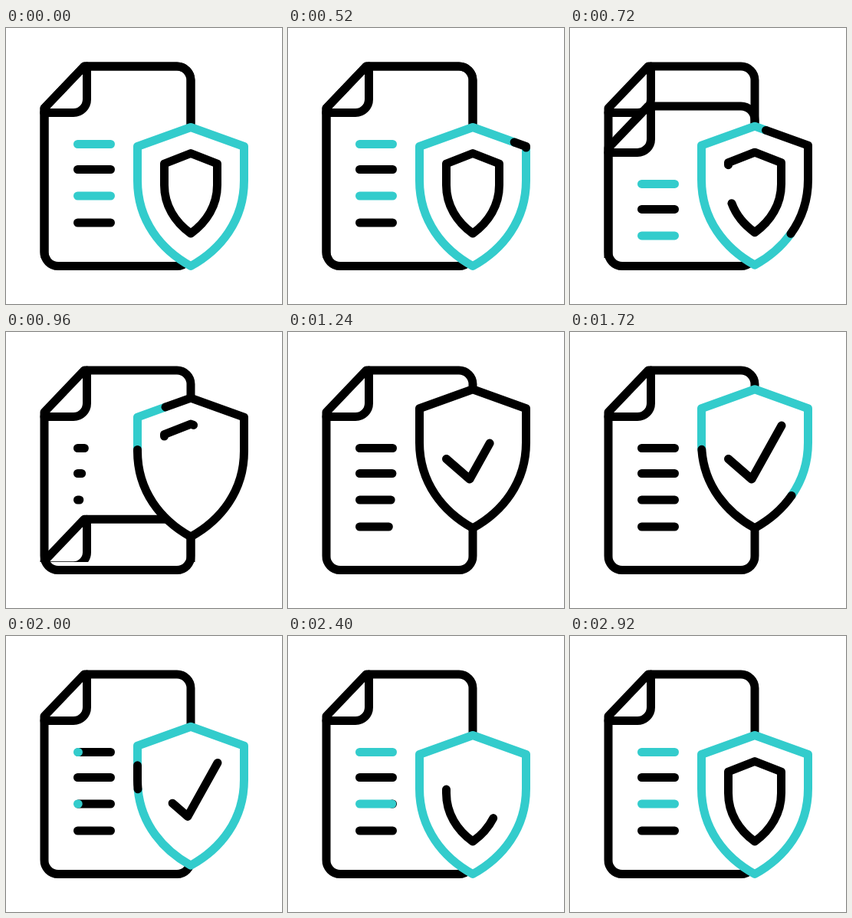
An HTML page for the animation above (3 s loop, 360x360 px).

```html
<!DOCTYPE html>
<html lang="en">
<head>
<meta charset="utf-8">
<title>Protected document</title>
<style>
  html, body { margin: 0; width: 100%; height: 100%; overflow: hidden; background: #fff; }
  svg { display: block; width: 100vw; height: 100vh; }
  .ink, .aqua { fill: none; stroke: #000; stroke-width: 11; stroke-linecap: round; stroke-linejoin: round; }
  .aqua { stroke: #33cccc; }
  .paper { fill: #fff; }
</style>
</head>
<body>
<svg viewBox="0 0 360 360">
  <defs>
    <path id="doc" d="M50 104.5 L102 50 H223 A18 18 0 0 1 241 68 V292 A18 18 0 0 1 223 310.5 H68 A18 18 0 0 1 50 292 Z"/>
    <path id="fold" d="M50 110.5 H88 A17.5 17.5 0 0 0 105.5 93 V50"/>
    <clipPath id="page"><rect width="360" height="300"/></clipPath>
  </defs>

  <use href="#fold" class="ink"/>
  <g id="rows"></g>
  <g clip-path="url(#page)">
    <g id="sheet">
      <use href="#doc" class="ink paper"/>
      <use href="#fold" class="ink"/>
    </g>
  </g>
  <use href="#doc" class="ink"/>

  <g id="shield">
    <path id="badge" class="paper" d="M241 129.5 L310.5 154.5 V199 C310.5 251 280 289 241 310.5 C202 289 171.5 251 171.5 199 V154.5 Z"/>
    <path id="glow" class="aqua" pathLength="100"/>
    <path id="rim" class="ink" pathLength="100"/>
    <path id="core" class="ink" pathLength="100" d="M206.5 177 V205 C206.5 231 220 253 241 268 C262 253 275.5 231 275.5 205 V177 L241 163.5 Z"/>
    <path id="tick" class="ink" pathLength="100" d="M206.5 220.2 L237 246.7 L276 176.7"/>
  </g>
</svg>
<script>
const LOOP = 3000, STEP = 40;
const $ = id => document.getElementById(id);
const rowY = [151.5, 184.5, 219, 254];

function addRow(parent, y, cls) {
  const p = document.createElementNS('http://www.w3.org/2000/svg', 'path');
  p.setAttribute('d', `M93.5 ${y} H136.5`);
  p.setAttribute('pathLength', 100);
  p.setAttribute('class', cls);
  return parent.appendChild(p);
}

const isAqua = i => i % 2 === 0;
const rows = rowY.map(y => addRow($('rows'), y, 'ink'));
const tints = rowY.map(y => addRow($('rows'), y, 'aqua'));
rowY.forEach((y, i) => addRow($('sheet'), y, isAqua(i) ? 'aqua' : 'ink'));
for (const id of ['glow', 'rim']) $(id).setAttribute('d', $('badge').getAttribute('d'));

const span = (t, from, to) => Math.min(1, Math.max(0, (t - from) / (to - from)));
const ease = (t, from, to) => (1 - Math.cos(Math.PI * span(t, from, to))) / 2;

// Shows the part of a path from a to b, in percent. Open paths get a gap too long to repeat.
function trim(el, a, b, gap = 300) {
  const len = b - a;
  el.style.display = len > 0.05 ? '' : 'none';
  el.style.strokeDasharray = len > 99.95 ? 'none' : `${len} ${gap}`;
  el.style.strokeDashoffset = -a;
}

// On closed paths the part may run across the seam.
const trimLoop = (el, a, b) => trim(el, a, b, 100 - (b - a));

function drawRim(t) {
  let a, b;
  if (t < 1400) {
    a = 14.5 - 0.041 * Math.max(0, t - 440);
    b = a + 100 * ease(t, 435, 1145);
  } else {
    const x = span(t, 1400, 2150);
    b = 69 + 14.5 * x;
    a = b - 100 * Math.pow(1 - x, 1.75);
  }
  trimLoop($('rim'), a, b);
  trimLoop($('glow'), b, a + 100);
}

function drawCore(t) {
  if (t < 1500) {
    const p = ease(t, 570, 1090);
    trimLoop($('core'), 100 * p, 100 + 7 * p * (1 - p));
  } else {
    const p = 1 - Math.pow(1 - span(t, 2100, 2900), 1.2);
    const a = 14.5 * (1 - p);
    trimLoop($('core'), a, a + 100 * p);
  }
}

function drawRows(t) {
  rows.forEach((row, i) => {
    const tint = isAqua(i) ? 100 * ease(t, 1960, 2380 + 30 * i) : 0;
    trim(row, tint, 100 * ease(t, 840 + 30 * i, 1240 + 30 * i));
    trim(tints[i], 0, tint);
  });
}

function draw(t) {
  const lift = 54.7 * (ease(t, 680, 1080) - ease(t, 1720, 2120));
  $('shield').setAttribute('transform', `translate(0 ${-lift})`);
  $('sheet').setAttribute('transform', `translate(0 ${270 * ease(t, 525, 1200)})`);
  $('sheet').style.display = t < 1200 ? '' : 'none';
  drawRows(t);
  drawRim(t);
  drawCore(t);
  trim($('tick'), 100 * ease(t, 1920, 2280), 100 * ease(t, 1040, 1330));
}

const begin = performance.now();
function tick() {
  const t = (performance.now() - begin) % LOOP;
  draw(Math.floor(t / STEP) * STEP);
  requestAnimationFrame(tick);
}
tick();
</script>
</body>
</html>
```
